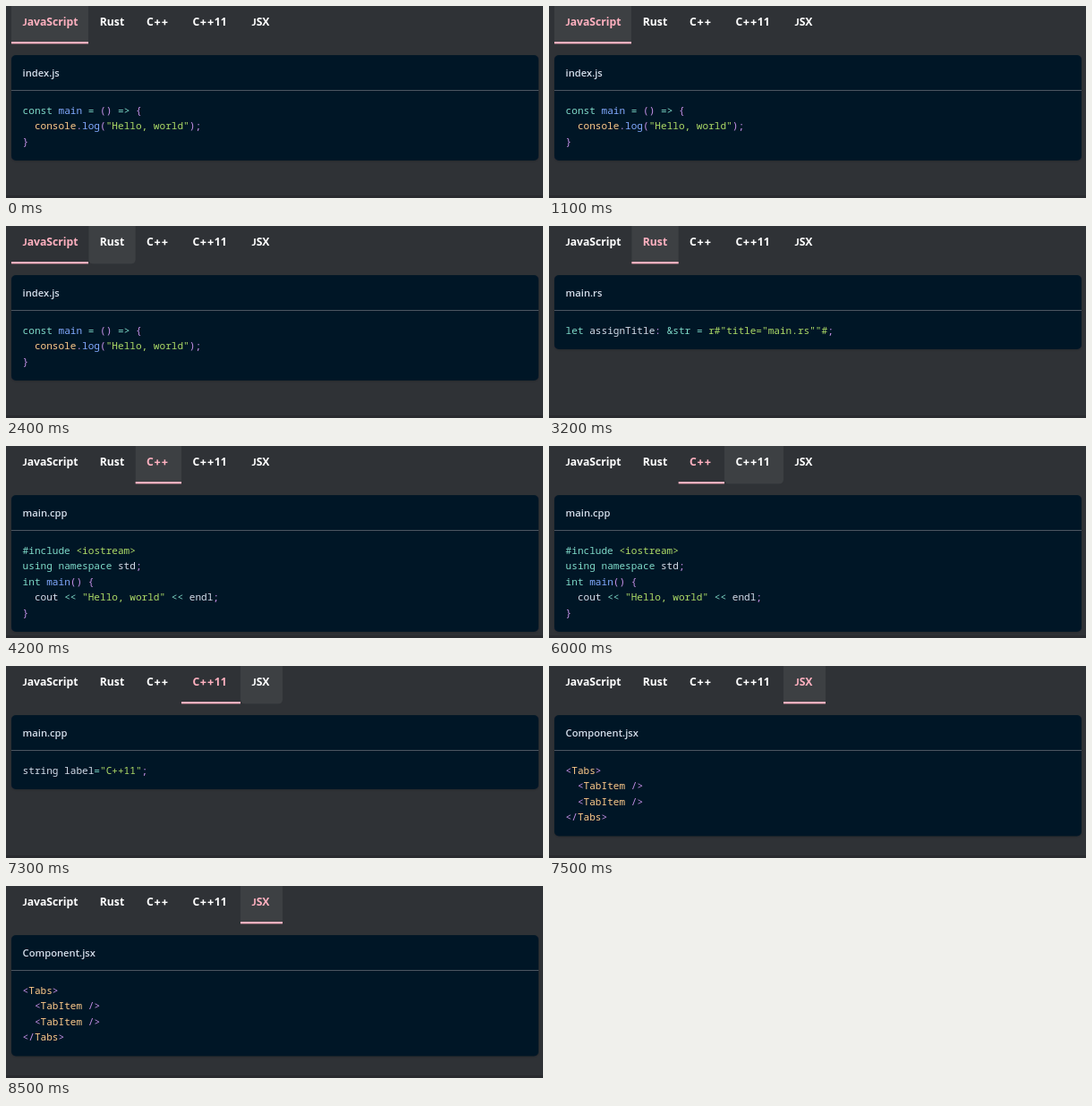
These frames come from a looping animation (600x215 px, 8800 ms). An HTML page:

```html
<!DOCTYPE html>
<html lang="en">
<head>
<meta charset="utf-8">
<title>Code tabs</title>
<style>
  html, body { margin: 0; width: 100%; height: 100%; overflow: hidden; background: #2f3236; }
  svg { display: block; }
  text { white-space: pre; }
  .tab { font: 700 12.2px "Open Sans", "Noto Sans", sans-serif; fill: #fff; }
  .tab.active { fill: #ffb1c0; }
  .tab .J { font-family: Lato, sans-serif; }
  .tab .plus { font-family: Inter, sans-serif; }
  .title { font: 600 11.2px "Open Sans", "Noto Sans", sans-serif; fill: #d6deeb; }
  .code { font: 400 11.08px "Noto Sans Mono", "DejaVu Sans Mono", monospace; fill: #d6deeb; }
  .string { fill: #addb67; }
  .keyword, .operator { fill: #7fdbca; }
  .type { fill: #ffcb8b; }
  .func { fill: #82aaff; }
  .punct { fill: #c792ea; }
</style>
</head>
<body>
<svg id="stage" width="600" height="215" viewBox="0 0 600 215">
  <defs>
    <filter id="shadow" x="-5%" y="-10%" width="110%" height="125%">
      <feDropShadow dx="0" dy="0.8" stdDeviation="1" flood-color="#000" flood-opacity="0.2"/>
    </filter>
  </defs>
  <rect width="600" height="215" fill="#2f3236"/>
  <rect y="212" width="600" height="3" fill="#292b2f"/>
</svg>
<script>
const LOOP = 8800;
const FADE = 200;
const LINE = 17.5;

const tabs = [
  { label: "JavaScript", x: 6, w: 86, file: "index.js", opens: 0, hover: [-FADE, 2000],
    code: ["const main = () => {", '  console.log("Hello, world");', "}"] },
  { label: "Rust", x: 92.4, w: 52.3, file: "main.rs", opens: 2600, hover: [2100, 3500],
    code: ['let assignTitle: &str = r#"title="main.rs""#;'] },
  { label: "C++", x: 144.7, w: 51.3, file: "main.cpp", opens: 4000, hover: [3600, 5400],
    code: ["#include <iostream>", "using namespace std;", "int main() {",
           '  cout << "Hello, world" << endl;', "}"] },
  { label: "C++11", x: 196, w: 66, file: "main.cpp", opens: 6200, hover: [5500, 6900],
    code: ['string label="C++11";'] },
  { label: "JSX", x: 262, w: 47, file: "Component.jsx", opens: 7500, hover: [7000, LOOP],
    code: ["<Tabs>", "  <TabItem />", "  <TabItem />", "</Tabs>"] }
];

const syntax = new RegExp([
  '(?<string>r#".*"#|"[^"]*"|<iostream>)',
  "(?<keyword>#include|&str|\\b(?:const|using|namespace|let|int)\\b)",
  "(?<type>console|Tab\\w*)",
  "(?<func>\\b(?:main|log)\\b)",
  "(?<operator>=>|<<|=)",
  "(?<punct><\\/|\\/>|[(){}<>;:.])"
].join("|"), "g");
const glyphs = /(?<J>J)|(?<plus>\++)/g;

const stage = document.getElementById("stage");

function add(parent, name, attrs = {}, content = "") {
  const node = document.createElementNS("http://www.w3.org/2000/svg", name);
  for (const key in attrs) node.setAttribute(key, attrs[key]);
  node.textContent = content;
  return parent.appendChild(node);
}

// Adds text whose matches of the pattern are classed by their group name.
function addStyled(parent, attrs, content, pattern) {
  const text = add(parent, "text", attrs);
  let end = 0;
  for (const match of content.matchAll(pattern)) {
    const kind = Object.keys(match.groups).find(key => match.groups[key]);
    text.append(content.slice(end, match.index));
    add(text, "tspan", { class: kind }, match[0]);
    end = match.index + match[0].length;
  }
  text.append(content.slice(end));
  return text;
}

for (const tab of tabs) {
  const { x, w, code } = tab;
  tab.glow = add(stage, "path", { fill: "#3d4043" });
  tab.bar = add(stage, "rect", { x, y: 40, width: w, height: 2.3, fill: "#ffb1c0" });
  tab.text = addStyled(stage, { class: "tab", x: x + 12.4, y: 21.5 }, tab.label, glyphs);

  tab.panel = add(stage, "g");
  add(tab.panel, "rect", {
    x: 6, y: 55, width: 589, height: 65.5 + LINE * code.length,
    rx: 5, fill: "#011627", filter: "url(#shadow)"
  });
  add(tab.panel, "rect", { x: 6, y: 94, width: 589, height: 0.8, fill: "#606770" });
  add(tab.panel, "text", { class: "title", x: 18.6, y: 78.7 }, tab.file);
  code.forEach((line, i) =>
    addStyled(tab.panel, { class: "code", x: 18.6, y: 120.6 + LINE * i }, line, syntax));
}

function fade(elapsed) {
  const p = Math.min(1, Math.max(0, elapsed / FADE));
  return 1 - (1 - p) ** 3;
}

function draw(t) {
  const current = tabs.filter(tab => tab.opens <= t).pop();
  for (const tab of tabs) {
    const active = tab === current;
    const [enter, leave] = tab.hover;
    const r = active ? 0 : 5;
    tab.glow.setAttribute("d",
      `M${tab.x} 0h${tab.w}V${42.3 - r}q0 ${r} ${-r} ${r}H${tab.x + r}q${-r} 0 ${-r} ${-r}z`);
    tab.glow.setAttribute("opacity", fade(t - enter) * (1 - fade(t - leave)));
    tab.text.classList.toggle("active", active);
    tab.bar.style.display = tab.panel.style.display = active ? "" : "none";
  }
}

const start = performance.now();
function tick() {
  draw((performance.now() - start) % LOOP);
  requestAnimationFrame(tick);
}
tick();
</script>
</body>
</html>
```
